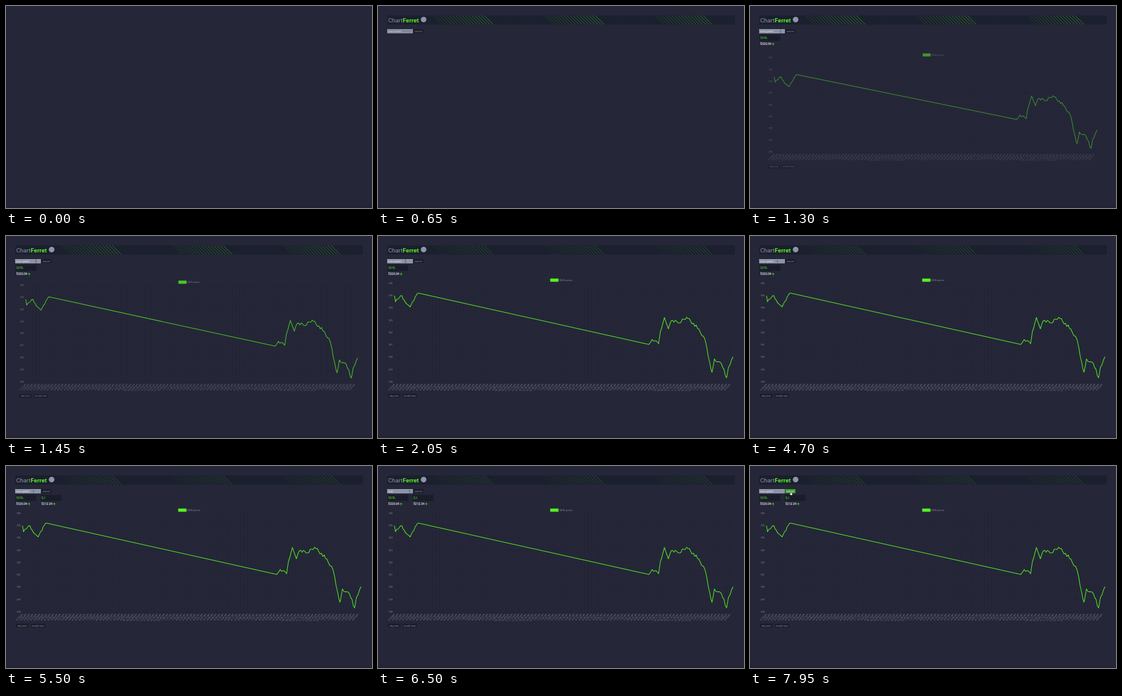
Animation of 600x332 px, one loop 8 s. Source, as an HTML page:

```html
<!DOCTYPE html>
<html lang="en">
<head>
<meta charset="utf-8">
<title>Stock chart</title>
<style>
html, body { margin: 0; width: 100%; height: 100%; overflow: hidden; background: #252738; }
svg { display: block; width: 100vw; height: 100vh; font-family: Roboto, "Open Sans", sans-serif; }
</style>
</head>
<body>
<svg id="stage" viewBox="0 0 600 332">
  <defs><clipPath id="bar"><rect x="83" y="15.5" width="502" height="15"/></clipPath></defs>
  <rect width="600" height="332" fill="#252738"/>
  <rect y="328" width="600" height="4" fill="#232333"/>
  <g id="head">
    <rect x="15.5" y="15.5" width="569.5" height="15" fill="#1b1f2e"/>
    <g id="stripes" clip-path="url(#bar)"></g>
    <text x="16.7" y="26.6" font-size="9.8" fill="#8e95ab">Chart<tspan font-weight="600" fill="#55ee22">Ferret</tspan></text>
    <circle cx="74.8" cy="22.3" r="4.6" fill="#8e95ab"/>
  </g>
  <g id="form">
    <rect x="15.6" y="38.3" width="41.2" height="6.2" fill="#8b92a7" stroke="#c3c7d2" stroke-width=".6"/>
    <text id="entry" x="16.5" y="42.7" font-size="3.8" fill="#f2f4f8"></text>
    <rect id="submit" x="58" y="38" width="16.5" height="6.6"/>
    <text id="submitText" x="66.2" y="42.6" font-size="4" text-anchor="middle">submit</text>
  </g>
  <g id="chips"></g>
  <g id="chart">
    <g id="grid" stroke="#1e2030" stroke-width=".5" opacity=".5"></g>
    <g id="labels" font-size="3.9" fill="#83889a"></g>
    <rect x="282.3" y="69.9" width="13.6" height="5.3" fill="#55ee22"/>
    <text x="297.3" y="73.9" font-size="3.9" fill="#8f94a5">QVXL prices</text>
    <path id="line" fill="none" stroke="#55ee22" stroke-width="1.05" stroke-linejoin="round"/>
    <g id="buttons" font-size="3.9" fill="#9599aa" text-anchor="middle">
      <rect x="16" y="259.2" width="21" height="6" fill="#1b1d2a"/>
      <text x="26.6" y="263.5">day view</text>
      <rect x="40" y="259.2" width="24" height="6" fill="#1b1d2a"/>
      <text x="52" y="263.5">month view</text>
    </g>
  </g>
  <g id="cursor">
    <path id="beam" d="M-1-2.8H1M0-2.8V2.8M-1 2.8H1" fill="none" stroke="#454a5c" stroke-width=".6"/>
    <path id="arrow" d="M0 0V5L1.2 4 2 5.8 2.9 5.4 2.1 3.7H3.6Z" fill="#111" stroke="#fff" stroke-width=".4"/>
    <path id="hand" d="M-.7-1.3Q0-2 .6-1.3V.8L2.4 1.3V3L1.8 4.4H-.6L-2 2.2-1.4 1.6-.7 2.2Z" fill="#fff" stroke="#222" stroke-width=".4"/>
  </g>
</svg>
<script>
const LOOP = 8000, BASE = 239.5, GREEN = '#55ee22';
const $ = id => document.getElementById(id);
const clamp = v => Math.max(0, Math.min(1, v));
const mix = (a, b, u) => a + (b - a) * u;
const span = (t, start, dur) => clamp((t - start) / dur);
const easeInOut = u => (1 - Math.cos(Math.PI * u)) / 2;
const easeOut = u => 1 - (1 - u) ** 4;
const set = (id, name, value) => $(id).setAttribute(name, value);

function add(parent, tag, attrs, text) {
  const el = document.createElementNS('http://www.w3.org/2000/svg', tag);
  for (const k in attrs) el.setAttribute(k, attrs[k]);
  if (text) el.textContent = text;
  parent.appendChild(el);
  return el;
}

let seed = 11;
const random = () => (seed = seed * 16807 % 2147483647) / 2147483647;

// Fills the way between turning points with small random steps
function walk(turns, step, jitter) {
  const out = [turns[0]];
  for (let i = 1; i < turns.length; i++) {
    const [a, b] = [turns[i - 1], turns[i]];
    const n = Math.max(1, Math.round((b[0] - a[0]) / step));
    for (let k = 1; k <= n; k++) {
      const shake = k < n ? (random() - .5) * 2 * jitter : 0;
      out.push([mix(a[0], b[0], k / n), mix(a[1], b[1], k / n) + shake]);
    }
  }
  return out;
}
const points = [
  ...walk([[27, 98], [28.7, 108], [39, 98], [45, 109.5], [52.7, 116.5], [65, 94], [67, 94]], 2.2, 2),
  ...walk([[444, 178.3], [449.5, 170], [460, 177], [463, 157], [469.5, 134], [476, 152.5], [481, 139], [494, 143],
    [506, 133.5], [526, 153], [536, 170], [544, 209], [547.6, 224], [551.5, 202], [563, 210], [571.5, 233],
    [574.5, 216], [582, 198.5]], 2.3, 2.5)
];

// Stripes brighten along each period, then drop back
const PERIOD = 181;
for (let x = 70; x < 590; x += 5.2) {
  const glow = Math.max(0, ((x + 6) % PERIOD) / PERIOD * 2.1 - 1.1);
  add($('stripes'), 'path', {
    d: `M${x} 15.5l15 15`, stroke: glow ? '#3fae2c' : '#233d3b',
    'stroke-width': .8, opacity: .3 + .6 * glow
  });
}

for (let i = 0; i < 9; i++) {
  const y = 77.5 + i * 20.25;
  add($('grid'), 'path', { d: `M25 ${y}H582` });
  add($('labels'), 'text', { x: 24, y: y + 1.3, 'text-anchor': 'end' }, String(306 - i));
}
for (let i = 0; i < 98; i++) {
  const x = 27 + i * 5.67;
  const min = Math.round(850 + i * 15.6) % 1440;
  const hour = Math.floor(min / 60);
  const label = `${hour % 12 || 12}:${String(min % 60).padStart(2, '0')} ${hour < 12 ? 'am' : 'pm'}`;
  add($('grid'), 'path', { d: `M${x} 77.5V241` });
  add($('labels'), 'text', { 'text-anchor': 'end', transform: `translate(${x + 1} 244) rotate(-48)` }, label);
}

function chip(x, symbol, price) {
  const g = add($('chips'), 'g', {});
  add(g, 'rect', { x, y: 47.5, width: 34, height: 10, fill: '#1a1c2a' });
  add(g, 'text', { x: x + 1.3, y: 54.4, 'font-size': 4.9, fill: GREEN }, symbol);
  add(g, 'text', { x: x + 1.3, y: 64.4, 'font-size': 4.9, 'font-weight': 500, fill: '#f4f5f8' }, price);
  add(g, 'path', { d: `M${x + 22.4} 64.7v-3.6m-1.7 1.5l1.7-1.7l1.7 1.7`, fill: 'none', stroke: GREEN, 'stroke-width': .9 });
  return g;
}
const chips = [
  { el: chip(15.5, 'QVXL', '$320.04'), at: 870 },
  { el: chip(56.8, 'QJ', '$212.34'), at: 5000 }
];

// Pointer moves: start, duration, x, y reached
const moves = [[1300, 500, 45, 41], [3200, 400, 62, 43], [4100, 500, 45, 40], [5700, 700, 52, 43], [7200, 600, 67, 43.5]];
function pointer(t) {
  let x = 50, y = 41;
  for (const [start, dur, toX, toY] of moves) {
    const u = easeInOut(span(t, start, dur));
    x = mix(x, toX, u);
    y = mix(y, toY, u);
  }
  return [x, y];
}

const typing = [
  { text: 'qj', from: 2500, key: 250, sent: 3620 },
  { text: 'nvqk', from: 6050, key: 130, sent: 7850 }
];
function entryText(t) {
  const run = typing.find(r => t >= r.from && t < r.sent);
  return run ? run.text.slice(0, 1 + Math.floor((t - run.from) / run.key)) : 'enter symbol';
}

function render(t) {
  const intro = easeOut(span(t, 100, 700));
  set('head', 'opacity', intro);
  set('head', 'transform', `translate(0 ${-14 * (1 - intro)})`);
  set('stripes', 'opacity', 1 - .45 * span(t, 1300, 600));
  set('form', 'opacity', span(t, 200, 500));
  for (const c of chips) c.el.setAttribute('opacity', span(t, c.at, 300));

  const p = easeInOut(span(t, 870, 820));
  const s = mix(.9, 1, p);
  set('chart', 'opacity', p);
  set('chart', 'transform', `translate(${300 * (1 - s)} ${244 * (1 - s)}) scale(${s})`);
  set('buttons', 'transform', `translate(0 ${6.5 * (1 - p)})`);
  const rise = easeOut(span(t, 845, 1000));
  set('line', 'd', 'M' + points.map(([x, y]) => `${x.toFixed(2)} ${mix(BASE, y, rise).toFixed(2)}`).join('L'));

  const [x, y] = pointer(t);
  const overInput = x < 56.8, overSubmit = x >= 58;
  set('cursor', 'transform', `translate(${x} ${y})`);
  set('cursor', 'opacity', t >= 950 ? 1 : 0);
  set('beam', 'opacity', overInput ? 1 : 0);
  set('hand', 'opacity', overSubmit ? 1 : 0);
  set('arrow', 'opacity', overInput || overSubmit ? 0 : 1);
  set('submit', 'fill', overSubmit ? '#3fa52b' : '#1b1d2a');
  set('submitText', 'fill', overSubmit ? '#f4f5f8' : '#8a8fa2');
  $('entry').textContent = entryText(t);
}

const start = performance.now();
function tick() {
  render((performance.now() - start) % LOOP);
  requestAnimationFrame(tick);
}
tick();
</script>
</body>
</html>
```
